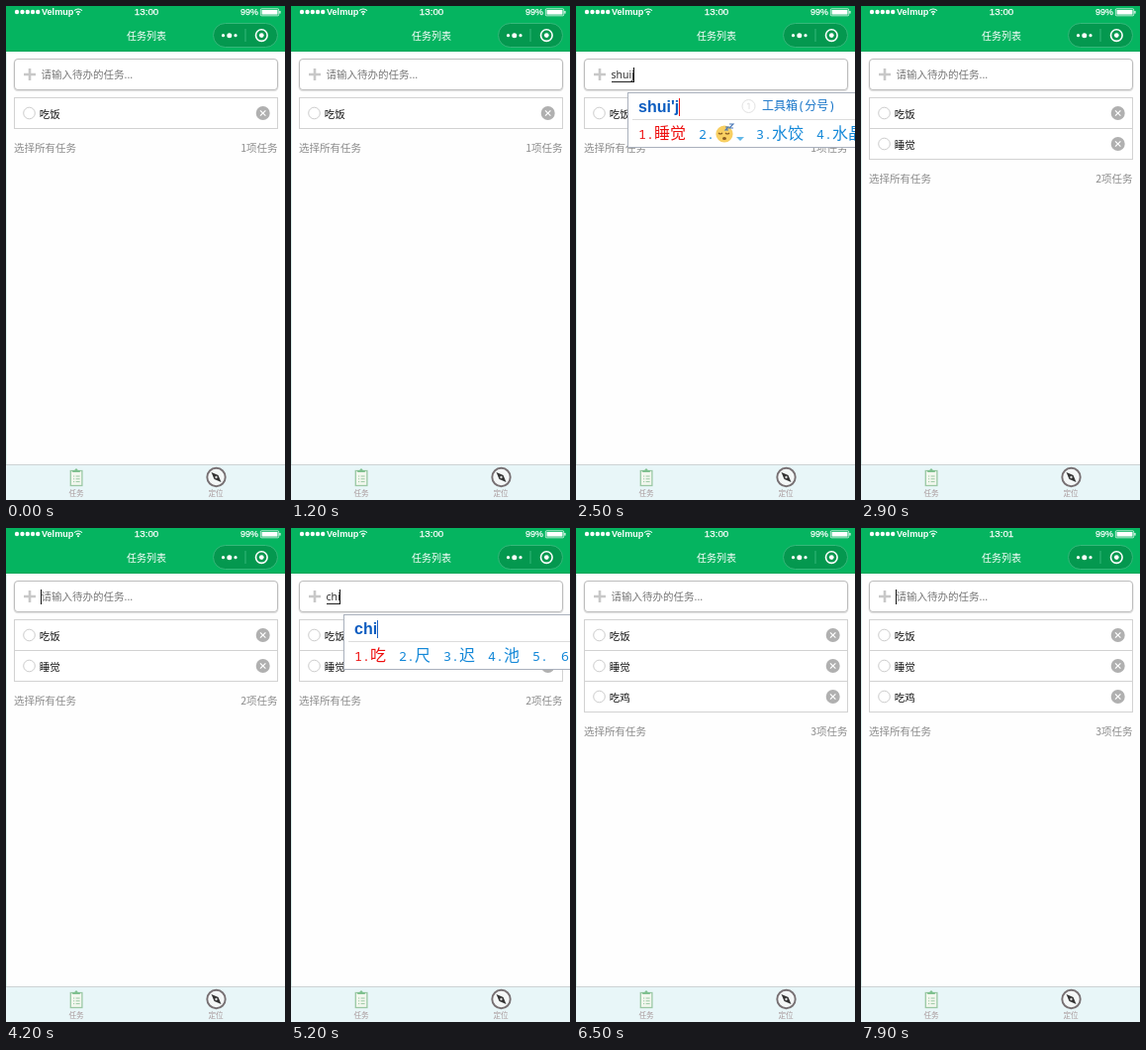
Recreate the animation shown at these times as an HTML page. Size 282x498 px, loop 8 s.

```html
<!DOCTYPE html>
<html lang="zh-CN">
<head>
<meta charset="utf-8">
<title>任务列表</title>
<style>
html, body { margin: 0; width: 100%; height: 100%; overflow: hidden; background: #fff; }
svg { display: block; width: 100vw; height: 100vh; }
text { font-family: "Open Sans", "Noto Sans CJK SC", "Noto Sans CJK", sans-serif; font-size: 10.5px; white-space: pre; }
.cjk { font-family: "Noto Sans CJK SC", "Noto Sans CJK", sans-serif; }
.status { font-family: "Liberation Sans", sans-serif; font-size: 9.8px; fill: #fff; stroke: #fff; stroke-width: .25px; }
.pinyin { font: bold 16px "Liberation Sans", sans-serif; fill: #0a5cc0; }
.cand { font-size: 16px; font-weight: 300; }
.num { font: 13.33px "Noto Sans Mono", monospace; }
</style>
</head>
<body>
<svg viewBox="0 0 282 498" preserveAspectRatio="none">
  <rect width="282" height="498" fill="#fefefe"/>
  <rect width="1" height="498" fill="#dff3ef"/>
  <rect width="282" height="46" fill="#05b460"/>
  <rect y="45" width="282" height="1" fill="#06a558"/>

  <g fill="#fff">
    <circle cx="11" cy="6" r="2.2"/><circle cx="16.5" cy="6" r="2.2"/><circle cx="21.8" cy="6" r="2.2"/>
    <circle cx="27" cy="6" r="2.2"/><circle cx="32.2" cy="6" r="2.2"/>
    <circle cx="73" cy="8.3" r="1"/>
    <rect x="258.5" y="4" width="16" height="4.6"/><rect x="276.3" y="5" width="1.2" height="2.6"/>
  </g>
  <g fill="none" stroke="#fff">
    <path d="M69 4.6Q73 1.4 77 4.6M70.8 6.5Q73 4.8 75.2 6.5" stroke-width="1.1"/>
    <rect x="257.3" y="2.8" width="18.4" height="7" rx="1" stroke-width=".7"/>
  </g>
  <text class="status" x="36" y="9" style="font-size:9.1px;font-weight:bold;stroke:none">Velmup</text>
  <text class="status" x="129.8" y="9" id="clock"></text>
  <text class="status" x="237" y="9" style="font-size:9px">99%</text>

  <text class="cjk" x="142" y="33.6" text-anchor="middle" fill="#fff" style="font-size:10px;font-weight:500">任务列表</text>
  <rect x="209.5" y="17.5" width="65" height="24" rx="12" fill="#04984f" stroke="#35b87a"/>
  <path d="M242 23v13" stroke="#35b87a"/>
  <g fill="#fff">
    <circle cx="219.5" cy="29.7" r="1.6"/><circle cx="225.8" cy="29.7" r="2.5"/><circle cx="232" cy="29.7" r="1.6"/>
    <circle cx="258.3" cy="29.6" r="2.4"/>
  </g>
  <circle cx="258.3" cy="29.6" r="5.8" fill="none" stroke="#fff" stroke-width="1.6"/>

  <rect x="8.5" y="54.3" width="266" height="31" rx="3.5" fill="none" stroke="#e4e4e4" stroke-width="2"/>
  <rect x="8.5" y="53.5" width="266" height="31" rx="3.5" fill="#fff" stroke="#bdbdbd"/>
  <path d="M18 69h12M24 63v12" stroke="#c8c8c8" stroke-width="2.6"/>
  <g id="view"></g>

  <rect y="462" width="282" height="36" fill="#e8f6f8"/>
  <path d="M0 462.5h282" stroke="#cdd3d4"/>
  <g fill="none" stroke="#9ac8a4">
    <rect x="65.3" y="468.5" width="11.6" height="15" stroke-width="1.3" fill="#f2f7ee"/>
    <path d="M68 474h1.2m1.4 0h4M68 476.8h1.2m1.4 0h4M68 479.6h1.2m1.4 0h4"/>
    <path d="M67.2 470v-2h2l1.8-2 1.8 2h2v2z" fill="#7fc08f" stroke="none"/>
  </g>
  <circle cx="212.5" cy="475" r="9.2" fill="#f4f7f7" stroke="#777073" stroke-width="1.9"/>
  <path d="M207.5 470l7 3 3 7-7-3z" fill="#333"/>
  <circle cx="212.5" cy="475" r="1.2" fill="#ddd"/>
  <g text-anchor="middle" fill="#a99a9c">
    <text class="cjk" x="71" y="494.3" style="font-size:7.6px">任务</text>
    <text class="cjk" x="212" y="494.3" style="font-size:7.6px">定位</text>
  </g>
</svg>
<script>
const LOOP = 8000;
const TASKS = ['吃饭', '睡觉', '吃鸡'];
const view = document.getElementById('view');
const clock = document.getElementById('clock');
const ruler = document.createElement('canvas').getContext('2d');

const type = (pinyin, cands, tool = false) => ({ pinyin, cands: cands.split(' '), tool, text: pinyin.replace("'", ''), caret: true });
const pick = text => ({ pinyin: '', text, caret: true });

// Each entry changes part of the state from its time on.
const steps = [
  [0, { rows: 1, time: '13:00', text: '', pinyin: '', caret: false, left: 52, mark: '#f01818' }],
  [800, { caret: true }],
  [1200, { caret: false }],
  [1600, type('s', '是 说 上 时 三', true)],
  [1700, type('sh', '是 上 说 时 事', true)],
  [1800, type('shu', '数 书 输 熟 shu')],
  [2000, { caret: false }],
  [2200, type('shui', '睡 水 谁 税 说')],
  [2400, type("shui'j", '睡觉 * 水饺 水晶', true)],
  [2600, pick('睡觉')],
  [2900, { rows: 2, text: '', caret: false }],
  [4200, { caret: true }],
  [4700, { caret: false }],
  [5000, { left: 53, mark: '#1b62c4', ...type('c', '才 从 次 出 成', true) }],
  [5100, type('ch', '吃 出 成 车 场', true)],
  [5200, type('chi', '吃 尺 迟 池  ')],
  [5400, type("chi'j", '吃鸡 赤鸡 持久 吃惊', true)],
  [5600, type("chi'ji", '吃鸡 赤鸡 赤几 齿及')],
  [5700, { caret: true }],
  [6000, pick('吃鸡')],
  [6400, { rows: 3, text: '', caret: true }],
  [6500, { caret: false }],
  [7500, { time: '13:01' }],
  [7900, { caret: true }],
];

function measure(text, font) {
  ruler.font = font;
  return ruler.measureText(text).width;
}

const line = (d, color, width = 1) => `<path d="${d}" stroke="${color}" stroke-width="${width}" fill="none"/>`;
const label = (x, y, text, color, extra = '') => `<text x="${x}" y="${y}" fill="${color}" ${extra}>${text}</text>`;

function inputField({ text, pinyin, caret }) {
  const end = 35.5 + (text && Math.round(measure(text, '10.5px "Open Sans","Noto Sans CJK SC",sans-serif')));
  return (text ? label(35.5, 73, text, '#222') : label(35.5, 73, '请输入待办的任务...', '#777', 'class="cjk"'))
    + (pinyin && line(`M36 76.5H${end}`, '#222'))
    + (caret ? line(`M${end} 62v15`, '#111') : '');
}

function taskList(rows) {
  let out = `<rect x="8.5" y="92.5" width="266" height="${rows * 31}" fill="#fff" stroke="#d2d2d2"/>`;
  for (let i = 0; i < rows; i++) {
    const y = 108 + i * 31;
    if (i) out += line(`M8 ${y - 15.5}h267`, '#d2d2d2');
    out += `<circle cx="23.5" cy="${y}" r="5.8" fill="#fff" stroke="#ccc"/>`
      + label(33.8, y + 4.8, TASKS[i], '#111', 'class="cjk" font-weight="500"')
      + `<circle cx="259.7" cy="${y}" r="7" fill="#b0b0b0"/>`
      + line(`M257 ${y - 2.7}l5.4 5.4m0-5.4l-5.4 5.4`, '#fff', 1.2);
  }
  const y = 116.3 + rows * 31;
  return out + label(8, y, '选择所有任务', '#8c8c8c', 'class="cjk"')
    + label(274.5, y, rows + '项任务', '#8c8c8c', 'class="cjk" text-anchor="end"');
}

const sleepyFace = x => `<circle cx="${x + 9}" cy="129" r="8.6" fill="#f8cf62"/>`
  + line(`M${x + 3} 128q2 2 4 0m3 0q2 2 4 0`, '#8a5a20', 1.1)
  + `<ellipse cx="${x + 9}" cy="133.5" rx="2" ry="1.6" fill="#8a5a20"/>`
  + line(`M${x + 10} 122h3l-3 3h3M${x + 14} 119h4l-4 4h4`, '#4a78b8', 1.1)
  + `<path d="M${x + 21} 132h8l-4 4z" fill="#62b8e8"/>`;

function candidates(list, x) {
  return list.map((word, i) => {
    const color = i ? '#1488d8' : '#ee1010';
    const face = word === '*';
    const item = label(x, 134, i + 1 + '.', color, 'class="num"')
      + (face ? sleepyFace(x + 17) : label(x + 16, 134.3, word, color, 'class="cjk cand"'));
    x += face ? 58 : 29 + 16 * word.length;
    return item;
  }).join('');
}

function popup({ pinyin, cands, tool, left, mark, caret }) {
  if (!pinyin) return '';
  const x = left + 11;
  const end = Math.round(x + measure(pinyin, 'bold 16px "Liberation Sans",sans-serif')) + .5;
  return `<rect x="${left + .5}" y="87.5" width="240" height="55" fill="#fff" stroke="#a9b0bc"/>`
    + line(`M${left + 5} 114.5H282`, '#dcdcdc')
    + label(x, 107, pinyin, '#0a5cc0', 'class="pinyin"')
    + (caret ? line(`M${end} 93v18`, mark) : '')
    + (tool ? `<circle cx="174.5" cy="101" r="6.5" fill="none" stroke="#e2e2e2"/>` + line('M173 99l2-1v6', '#e2e2e2')
      + label(188, 105.3, '工具箱<tspan class="num" style="font-size:12px">(</tspan>分号<tspan class="num" style="font-size:12px">)</tspan>', '#1674c8', 'class="cjk" style="font-size:12px"') : '')
    + candidates(cands, x);
}

let shown = -1;
function frame(now) {
  const past = steps.filter(([at]) => at <= now % LOOP);
  if (past.length !== shown) {
    shown = past.length;
    const state = Object.assign({}, ...past.map(([, change]) => change));
    clock.textContent = state.time;
    view.innerHTML = inputField(state) + taskList(state.rows) + popup(state);
  }
  requestAnimationFrame(() => frame(performance.now()));
}
frame(0);
</script>
</body>
</html>
```
